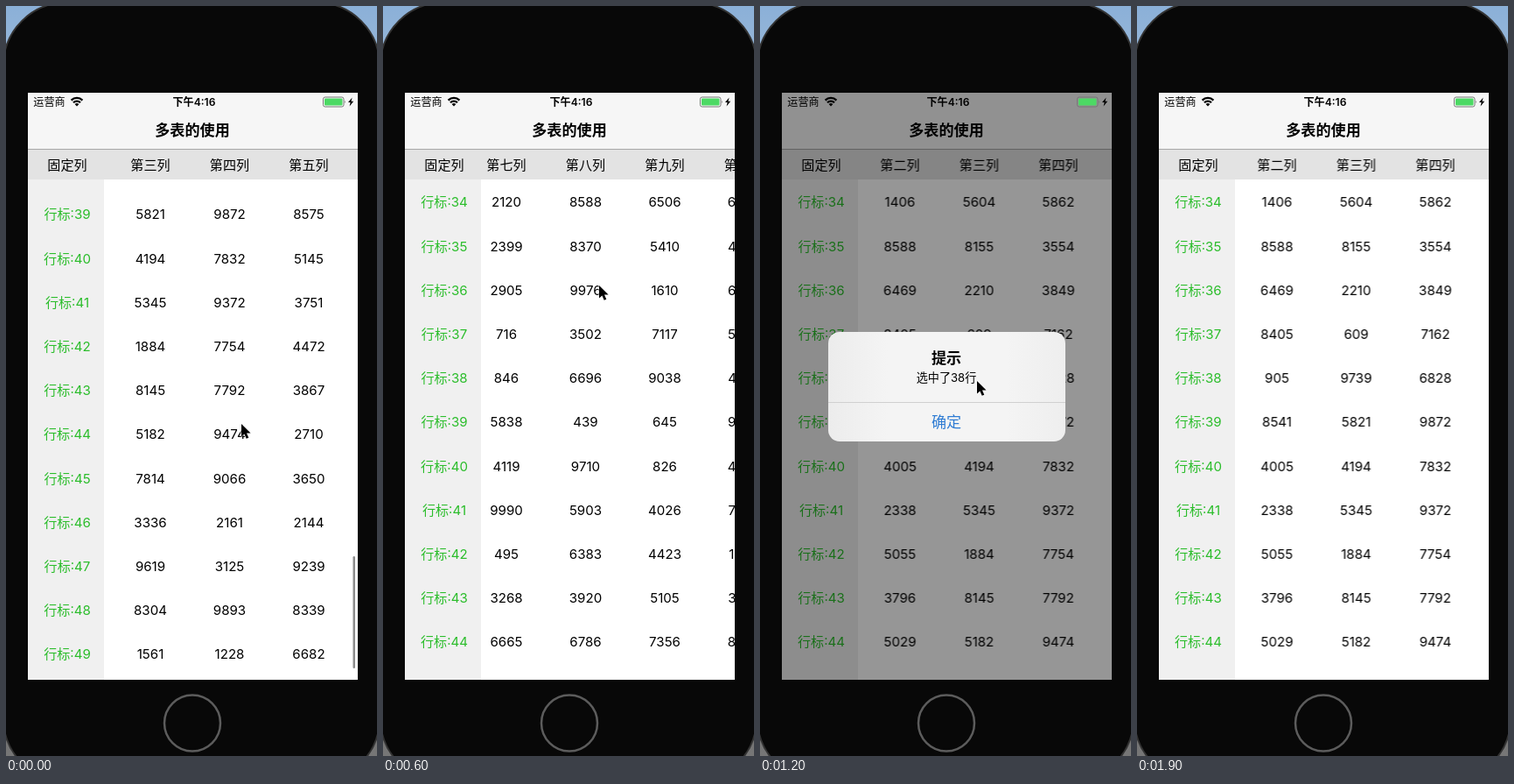
An HTML page for the animation above (2 s loop, 424 by 856 pixels).

```html
<!DOCTYPE html>
<html lang="zh-CN">
<head>
<meta charset="utf-8">
<title>多表的使用</title>
<style>
  html, body { margin: 0; width: 100%; height: 100%; overflow: hidden; }
  svg { display: block; width: 424px; height: 856px; }
  text { font: 15.1px Inter, "Noto Sans CJK SC", "Noto Sans CJK", sans-serif; text-anchor: middle; }
  .label { fill: #2bbd2b; }
  .status { font-size: 12.1px; }
  .semi { font-weight: 600; }
  .title { font-size: 17.1px; }
  .note { font-size: 13.1px; }
  .action { font-size: 17.1px; fill: #2d7bd3; }

  .rows, .cols, .pointer, .alert, .bar { animation: 2s step-end infinite; }
  .rows { animation-name: rows; }
  .cols { animation-name: cols; }
  .pointer { animation-name: pointer; }
  .alert { animation-name: alert; }
  .bar { animation-name: bar; }

  @keyframes rows {
    0% { transform: translateY(0); }
    5% { transform: translateY(62px); }
    10% { transform: translateY(170px); }
    15% { transform: translateY(220px); }
    20% { transform: translateY(234px); }
    25%, 100% { transform: translateY(237px); }
  }
  @keyframes cols {
    0% { transform: translateX(0); }
    20% { transform: translateX(-12px); }
    25% { transform: translateX(-220px); }
    30% { transform: translateX(-386px); }
    35% { transform: translateX(-300px); }
    40% { transform: translateX(0); }
    45% { transform: translateX(86.5px); }
    50%, 100% { transform: translateX(85.5px); }
  }
  @keyframes pointer {
    0% { transform: translate(269px, 477px); }
    5% { transform: translate(84px, 338px); }
    10% { transform: translate(78px, 446px); }
    15% { transform: translate(190px, 400px); }
    20% { transform: translate(345px, 335px); }
    25% { transform: translate(300px, 322px); }
    30% { transform: translate(247px, 319px); }
    35% { transform: translate(215px, 328px); }
    40% { transform: translate(290px, 338px); }
    45% { transform: translate(328px, 342px); }
    50% { transform: translate(300px, 375px); }
    55% { transform: translate(250px, 426px); }
    60% { transform: translate(248px, 428px); }
    65% { transform: translate(235px, 452px); }
    70% { transform: translate(222px, 472px); }
    75% { transform: translate(222px, 474px); }
    80% { transform: translate(300px, 640px); opacity: 1; }
    85%, 100% { transform: translate(300px, 640px); opacity: 0; }
  }
  @keyframes alert {
    0% { opacity: 0; }
    60% { opacity: 1; }
    75% { opacity: .4; }
    80%, 100% { opacity: 0; }
  }
  @keyframes bar {
    0% { opacity: 1; }
    5%, 100% { opacity: 0; }
  }
</style>
</head>
<body>
<svg viewBox="0 0 424 856">
  <defs>
    <linearGradient id="sky" x2="0" y2="1">
      <stop stop-color="#8bb0d8"/><stop offset=".1" stop-color="#9dbad8"/>
      <stop offset=".9" stop-color="#666"/><stop offset="1" stop-color="#777"/>
    </linearGradient>
    <linearGradient id="glass">
      <stop stop-color="#ececec"/><stop offset=".25" stop-color="#f4f4f4"/>
      <stop offset=".75" stop-color="#f4f4f4"/><stop offset="1" stop-color="#eee"/>
    </linearGradient>
    <clipPath id="body"><rect x="25" y="198" width="377" height="571"/></clipPath>
    <clipPath id="cells"><rect x="112" y="164" width="290" height="605"/></clipPath>
  </defs>

  <rect width="424" height="856" fill="url(#sky)"/>
  <rect x="-3" y="-4" width="430" height="889" rx="72" fill="#080808" stroke="#333" stroke-width="2"/>
  <circle cx="213" cy="818.5" r="32" fill="#080808" stroke="#5c5c5c" stroke-width="2.5"/>

  <rect x="25" y="99" width="377" height="670" fill="#fff"/>
  <rect x="25" y="198" width="87" height="571" fill="#f0f0f0"/>
  <g clip-path="url(#body)">
    <g class="rows" id="labels"></g>
    <g clip-path="url(#cells)"><g class="rows"><g class="cols" id="grid"></g></g></g>
  </g>
  <rect class="bar" x="396.5" y="628" width="2.5" height="128" rx="1.25" fill="#8c8c8c"/>

  <rect x="25" y="99" width="377" height="64" fill="#f6f6f6"/>
  <rect x="25" y="163" width="377" height="35" fill="#e3e3e3"/>
  <rect x="25" y="163" width="377" height="1" fill="#a8a8a8"/>
  <text class="title semi" x="213" y="147.5">多表的使用</text>
  <text x="70" y="186.5">固定列</text>
  <g clip-path="url(#cells)"><g class="cols" id="heads"></g></g>

  <g class="alert">
    <rect x="25" y="99" width="377" height="670" opacity=".41"/>
    <rect x="78" y="372" width="271" height="125" rx="13" fill="url(#glass)"/>
    <path d="M78 452.5H349" stroke="#d0d0d0"/>
    <text class="title semi" x="213" y="408">提示</text>
    <text class="note" x="213" y="428.5">选中了38行</text>
    <text class="action" x="213" y="481">确定</text>
  </g>

  <g>
    <text class="status" x="49.5" y="114">运营商</text>
    <text class="status semi" x="215" y="113.5">下午4:16</text>
    <g fill="none" stroke="#000" stroke-width="2.3">
      <path d="M74.6 107.6a9 9 0 0 1 12.8 0M77 110.2a5.7 5.7 0 0 1 8 0"/>
    </g>
    <path d="M81 114.6l-2.4-2.5a3.4 3.4 0 0 1 4.8 0z"/>
    <rect x="362.5" y="104" width="23.5" height="11" rx="2.2" fill="none" stroke="#777"/>
    <rect x="364" y="105.5" width="20.5" height="8" rx="1" fill="#4cd964"/>
    <path d="M387.3 107.7q1.6 1.8 0 3.6z" fill="#777"/>
    <path d="M395.6 104.5l-4.6 5.6h2.6l-1 4.4 4.6-5.8h-2.7z"/>
  </g>

  <path class="pointer" d="M0 0V14.5L3.4 11.4 5.7 16.8 8.3 15.7 6 10.5H10.6Z" stroke="#fff" stroke-width="1" paint-order="stroke"/>
</svg>
<script>
  const firstRow = 33, lastRow = 49, rowGap = 50.2, colGap = 90.5;
  const numerals = "一二三四五六七八九十";

  // Known cells of each column, from row 34 downwards.
  const values = {
    2: "1406 8588 6469 8405 905 8541 4005 2338 5055 3796 5029",
    3: "5604 8155 2210 609 9739 5821 4194 5345 1884 8145 5182 7814 3336 9619 8304 1561",
    4: "5862 3554 3849 7162 6828 9872 7832 9372 7754 7792 9474 9066 2161 3125 9893 1228",
    5: "7310 4504 6068 2391 9502 8575 5145 3751 4472 3867 2710 3650 2144 9239 8339 6682",
    7: "2120 2399 2905 716 846 5838 4119 9990 495 3268 6665",
    8: "8588 8370 9976 3502 6696 439 9710 5903 6383 3920 6786",
    9: "6506 5410 1610 7117 9038 645 826 4026 4423 5105 7356",
    10: "6482 4637 6205 5829 4376 9053 4268 7539 1684 3907 8426"
  };

  let seed = 7;
  const random = () => (seed = seed * 16807 % 2147483647) / 2147483647;

  function addText(parent, content, x, y, className = "") {
    const node = document.createElementNS("http://www.w3.org/2000/svg", "text");
    node.setAttribute("x", x);
    node.setAttribute("y", y);
    node.setAttribute("class", className);
    node.textContent = content;
    document.getElementById(parent).append(node);
  }

  const rowY = row => 243.4 + (row - 39) * rowGap;
  const colX = col => 165 + (col - 3) * colGap;

  for (let row = firstRow; row <= lastRow; row++) addText("labels", "行标:" + row, 70, rowY(row), "label");

  for (let col = 1; col <= 10; col++) {
    const known = (values[col] || "").split(" ");
    addText("heads", `第${numerals[col - 1]}列`, colX(col), 186.5);
    for (let row = firstRow; row <= lastRow; row++) {
      const filler = Math.floor(1000 + random() * 9000);
      addText("grid", known[row - 34] || filler, colX(col), rowY(row));
    }
  }
</script>
</body>
</html>
```
